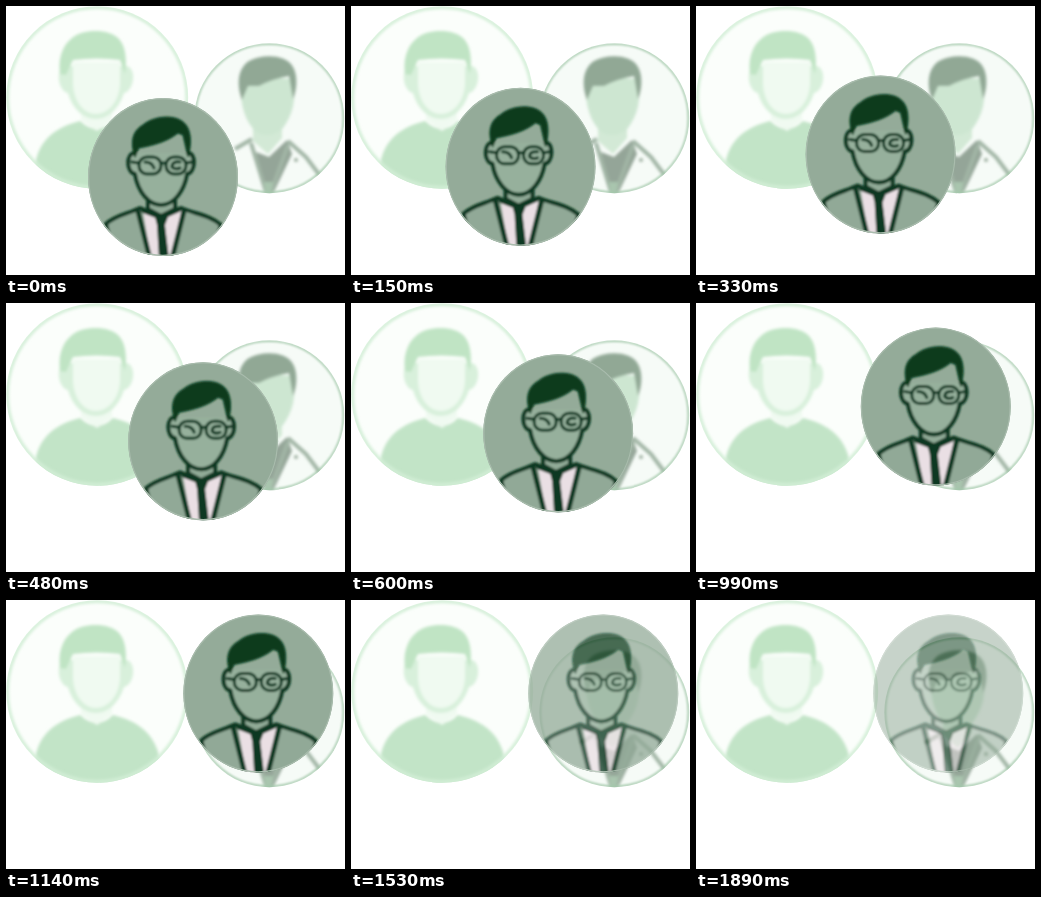
Write an HTML page that moves like this. It is 339 px wide and 269 px high and loops after 1.92 s.

```html
<!DOCTYPE html>
<html lang="en">
<head>
<meta charset="utf-8">
<title>Portraits</title>
<style>
html, body { margin: 0; width: 100%; height: 100%; overflow: hidden; background: #fff; }
svg { display: block; width: 100vw; height: 100vh; }
</style>
</head>
<body>
<svg viewBox="0 0 339 269" preserveAspectRatio="none">
  <defs>
    <clipPath id="leftClip"><ellipse cx="91.2" cy="91.5" rx="91" ry="91.3"/></clipPath>
    <clipPath id="rightClip"><circle cx="263.3" cy="112.3" r="75"/></clipPath>
    <clipPath id="frontClip"><ellipse rx="75" ry="79"/></clipPath>
    <filter id="soft"><feGaussianBlur stdDeviation="1.8"/></filter>
    <filter id="slight"><feGaussianBlur stdDeviation="1.1"/></filter>
  </defs>

  <g clip-path="url(#leftClip)">
    <rect width="184" height="184" fill="#fbfefb"/>
    <g filter="url(#soft)">
      <path d="M29 160C32 137 46 122 74 115Q91 131 107 115C136 122 150 137 154 160L150 190H32Z" fill="#c2e4c7"/>
      <path d="M75 103V114L91 125L106 114V103Z" fill="#f0faf1"/>
      <path d="M59 60C49 63 52 85 62 87C66 102 77 113 90 113C103 113 113 102 118 87C128 85 131 63 121 60Z" fill="#d8f0db"/>
      <path d="M67 56H114V78C113 97 101 108 90 108C78 108 68 96 67 78Z" fill="#f0faf1"/>
      <path d="M54 68C52 53 56 40 66 32C76 23 103 22 113 33C120 41 121 54 119 68L114 54Q91 51 67 54L60 69Z" fill="#c0e4c4"/>
    </g>
    <ellipse cx="91.2" cy="91.5" rx="90" ry="90.3" fill="none" stroke="#d2eed6" stroke-width="3.5" filter="url(#soft)"/>
  </g>

  <g clip-path="url(#rightClip)">
    <rect x="187" y="36" width="153" height="153" fill="#f6fbf7"/>
    <g filter="url(#soft)">
      <path d="M250 146L263 151L281 134L286 148L266 190H259Z" fill="#94a598"/>
      <path d="M247 118H276V132L262 148L247 135Z" fill="#d3e9d6"/>
      <path d="M235 80L246 70L287 73C291 94 286 110 277 122C267 133 251 131 245 120C238 111 234 95 235 80Z" fill="#cde6d1"/>
      <path d="M236 94C230 78 232 62 243 55C256 48 280 48 287 61C292 70 291 83 287 93L283 70Q266 73 253 80L242 80Z" fill="#91a895"/>
      <g fill="none" stroke="#a1b5a5" stroke-width="4">
        <path d="M246 133L229 143M245 137L260 186M282 139L265 186"/>
        <path d="M282 135L300 151L315 171"/>
      </g>
      <path d="M258 176H267L265 190H259Z" fill="#a9c5ae"/>
      <circle cx="290" cy="154" r="2" fill="#9caea0"/>
    </g>
    <circle cx="263.3" cy="112.3" r="74.2" fill="none" stroke="#a3c8aa" stroke-width="2" filter="url(#slight)"/>
  </g>

  <g id="front">
    <g clip-path="url(#frontClip)">
      <rect x="-76" y="-80" width="152" height="160" fill="#94ab99"/>
      <g filter="url(#slight)" fill="none" stroke="#0b3820" stroke-width="4" stroke-linejoin="round" stroke-linecap="round">
        <path d="M-57 47C-47 38 -35 37 -23 31L-3 39L18 31C32 37 47 38 58 48L48 82H-49Z" fill="#91a997"/>
        <path d="M-20 34L-2 39L18 34L10 82H-12Z" fill="#eadfe4" stroke="none"/>
        <path d="M-15 21V32L-2 39L12 32V21" fill="#91aa97"/>
        <path d="M-28 -24C-37 -24 -37 -5 -28 -3C-25 15 -14 28 -2 28C11 28 21 14 24 -3C33 -5 33 -24 25 -24" fill="#96b09c"/>
        <path d="M-28 -20C-33 -34 -31 -46 -20 -52C-10 -61 14 -64 23 -52C29 -44 28 -30 25 -20L20 -42L15 -44C5 -36 -8 -32 -24 -29Z" fill="#073b1c" stroke="#073b1c" stroke-width="1"/>
        <g stroke-width="3">
          <rect x="-24" y="-20" width="22" height="17" rx="8"/>
          <rect x="3" y="-20" width="20" height="17" rx="8"/>
          <path d="M-2 -14H3M-31 -15L-24 -14M23 -14L29 -15M-18 -15Q-11 -15 -9 -9M17 -15Q9 -16 9 -10Q12 -7 17 -9"/>
        </g>
        <path d="M-25 34L-13 82M21 34L9 82" stroke-width="5"/>
        <path d="M-20 34L-2 41L16 33" stroke-width="4"/>
        <path d="M-8 40H5L2 48L6 82H-4L-6 48Z" fill="#0b3820" stroke="none"/>
      </g>
      <ellipse rx="74.5" ry="78.5" fill="none" stroke="#a9bcad" stroke-width="1.5"/>
    </g>
  </g>
</svg>
<script>
const LOOP = 1920, STEP = 30, ARRIVE = 1140;
const front = document.getElementById('front');
const start = performance.now();

function draw(time) {
  const t = Math.floor((time % LOOP) / STEP) * STEP;
  const move = Math.min(t / ARRIVE, 1);
  const fade = Math.max(t - ARRIVE, 0) / (LOOP - ARRIVE);
  front.setAttribute('transform', `translate(${157 + 95.3 * move} ${171 - 77.6 * move})`);
  front.setAttribute('opacity', 1 - 0.5 * fade);
}

function tick() {
  draw(performance.now() - start);
  requestAnimationFrame(tick);
}
tick();
</script>
</body>
</html>
```
